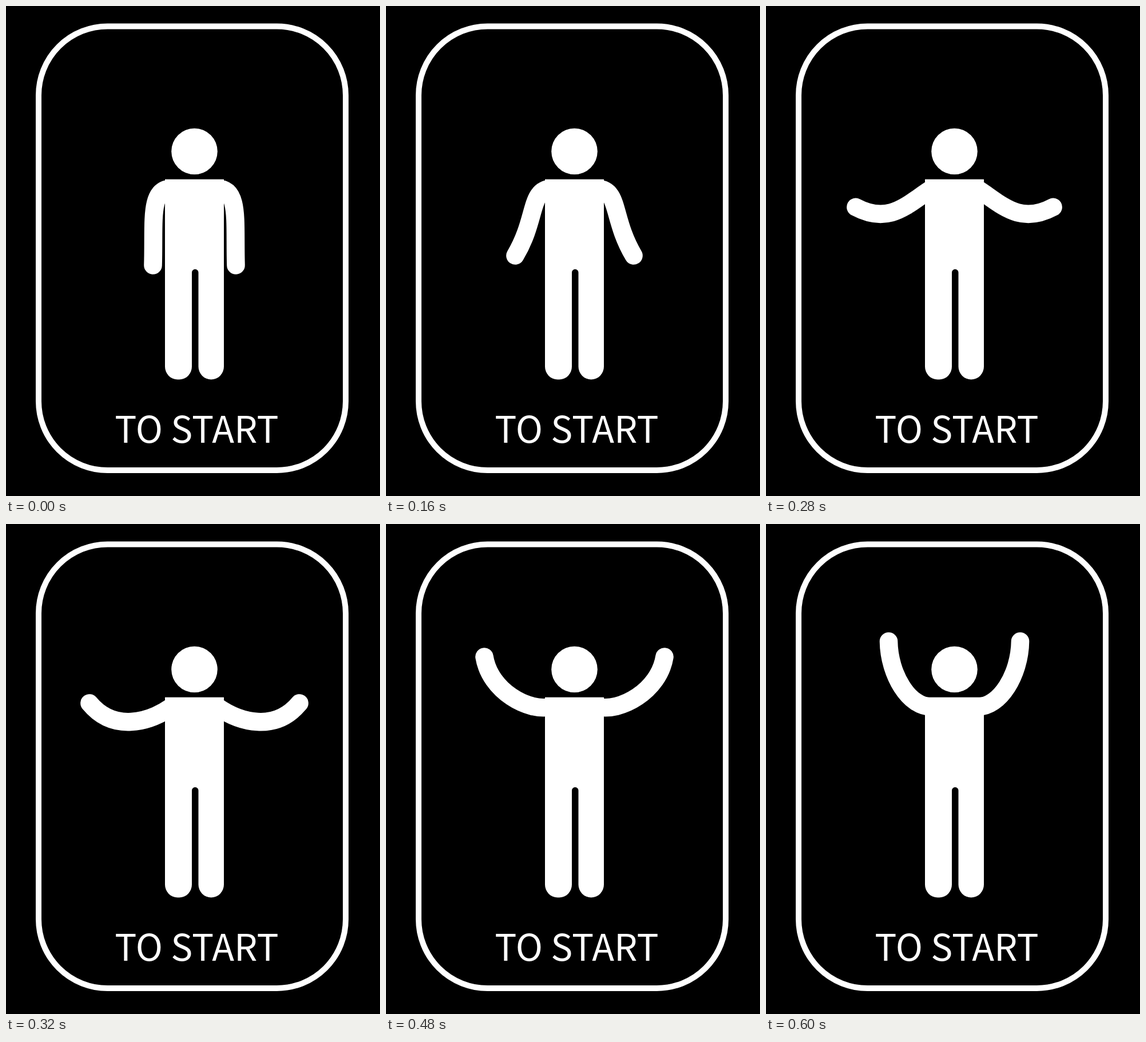
Write an HTML page that moves like this. It is 654 px wide and 856 px high and loops after 1.64 s.

```html
<!DOCTYPE html>
<html lang="en">
<head>
<meta charset="utf-8">
<title>To start</title>
<style>
  html, body { margin: 0; width: 100%; height: 100%; overflow: hidden; background: #000; }
  svg { display: block; }
  text { font: 63.8px "Noto Sans CJK JP", "Noto Sans CJK SC", "Noto Sans CJK", "Noto Sans", sans-serif; }
</style>
</head>
<body>
<svg width="654" height="856" viewBox="0 0 654 856" fill="#fff">
  <rect x="57" y="35.5" width="537" height="775.5" rx="120.5" fill="none" stroke="#fff" stroke-width="10"/>
  <circle cx="329.5" cy="254" r="40.3"/>
  <path d="M278 302.7H381V630a22.25 22.5 0 0 1-44.5 0V465.5a5.75 5.75 0 0 0-11.5 0V630a22 22.5 0 0 1-22 22.5h-3a22 22.5 0 0 1-22-22.5Z"/>
  <g fill="none" stroke="#fff" stroke-width="31.6" stroke-linecap="round">
    <path id="arm"/>
    <use href="#arm" transform="translate(659) scale(-1 1)"/>
  </g>
  <text x="333.5" y="763" text-anchor="middle">TO START</text>
</svg>
<script>
const LOOP = 1640, STEP = 40;

// Path of the left hand
const keys = [
  { at: 0,   x: 257, y: 453 },
  { at: 160, x: 226, y: 436 },
  { at: 240, x: 175, y: 390 },
  { at: 320, x: 146, y: 313 },
  { at: 400, x: 152, y: 270 },
  { at: 480, x: 172, y: 232 },
  { at: 600, x: 214.5, y: 205 },
];
const last = keys.length - 1;

// The hand rests at both ends
function speed(i, axis) {
  if (i === 0 || i === last) return 0;
  const a = keys[i - 1], b = keys[i + 1];
  return (b[axis] - a[axis]) / (b.at - a.at);
}

// Smooth curve through the keys
function handAt(time, axis) {
  if (time >= keys[last].at) return keys[last][axis];
  const i = keys.findIndex(k => k.at > time) - 1;
  const a = keys[i], b = keys[i + 1];
  const span = b.at - a.at, u = (time - a.at) / span, v = 1 - u;
  return v * v * (1 + 2 * u) * a[axis] + u * u * (3 - 2 * u) * b[axis] +
    span * u * v * (v * speed(i, axis) - u * speed(i + 1, axis));
}

// The height of the hand decides how far the shoulder sags and the wrist bends
function armPath(x, y) {
  const lift = Math.atan2(282 - x, y - 319);
  const sag = 28 * Math.sin(lift) ** 4;
  const wrist = lift + 0.85 * Math.sin(1.1 * (lift - 0.35));
  const reach = 80 - 8.6 * lift;
  const wristX = x + reach * Math.sin(wrist), wristY = y - reach * Math.cos(wrist);
  return `M290 319C250 ${319 + sag} ${wristX} ${wristY} ${x} ${y}`;
}

const arm = document.getElementById("arm");

function draw() {
  const time = Math.floor(performance.now() % LOOP / STEP) * STEP;
  arm.setAttribute("d", armPath(handAt(time, "x"), handAt(time, "y")));
  requestAnimationFrame(draw);
}
draw();
</script>
</body>
</html>
```
